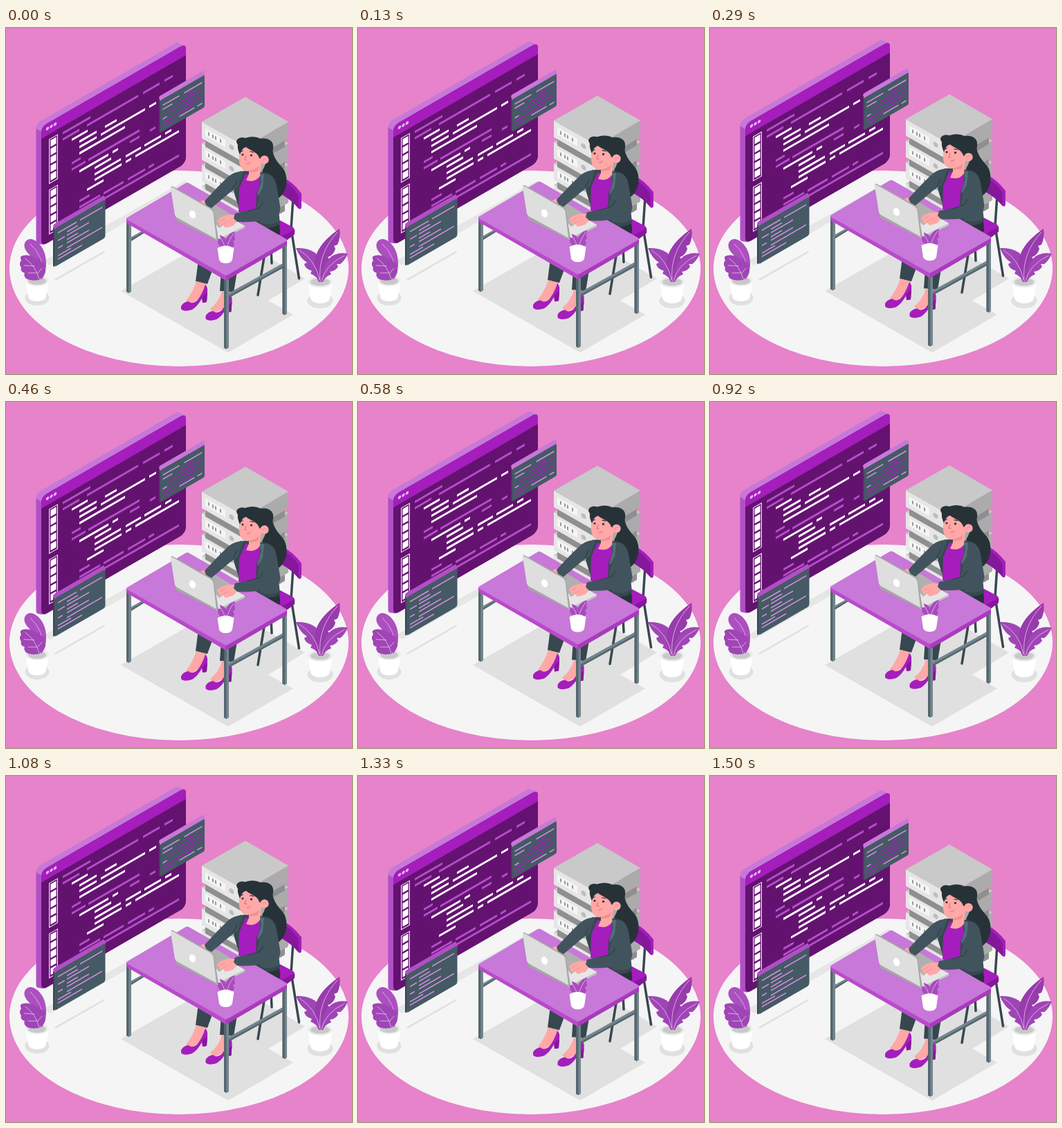
Write an HTML page that moves like this. It is 500 px wide and 500 px high and loops after 1540 ms.

```html
<!DOCTYPE html>
<html lang="en">
<head>
<meta charset="utf-8">
<title>Developer at a desk</title>
<style>
  html, body { margin: 0; width: 100%; height: 100%; overflow: hidden; background: #e683cb; }
  svg { display: block; width: 100%; height: 100%; }
  .shade { fill: #e0e0e0; }
  .vivid { fill: #a51dbd; }
  .deep { fill: #85189a; }
  .light { fill: #c778d8; }
  .slate { fill: #455a64; }
  .dark { fill: #37474f; }
  .sleeve { fill: #41545d; }
  .hair { fill: #263238; }
  .skin { fill: #ffa8a7; }
  .leaf { fill: #a045b5; }
  .line { fill: none; stroke-linecap: round; stroke-linejoin: round; }
  .vein { fill: none; stroke: #e6c6ee; stroke-width: .8; stroke-linecap: round; }
</style>
</head>
<body>
<svg viewBox="0 0 500 500">
  <ellipse cx="250" cy="347.5" rx="245" ry="141.5" fill="#f5f5f5"/>
  <g class="shade">
    <path d="M166 380 262 325 300 300 350 315 378 331 432 362 379 394 415 414 321 469z"/>
    <path d="M54 337 258 221 268 226 64 343z" fill="#e6e6e6"/>
    <path d="M70 363 142 322 143 324 72 365z"/>
    <ellipse cx="45" cy="390" rx="17.5" ry="11"/>
    <ellipse cx="454" cy="394" rx="18.5" ry="11"/>
  </g>

  <g id="float">
    <!-- large code window -->
    <g transform="translate(51 143) skewY(-30)">
      <path class="light" d="M-7.5-2q0-7 7-7H196L207 2 0 14z"/>
      <path fill="#b14fc6" d="M-7.5-2 0 7V165L3 172-5 166Q-7.5 164-7.5 160z"/>
      <rect width="209" height="173" rx="8" fill="#641270"/>
      <path class="vivid" d="M0 17V8Q0 0 8 0H201Q209 0 209 8V17z"/>
      <g fill="#e6bdee"><circle cx="9" cy="7.5" r="2.2"/><circle cx="14.5" cy="7.5" r="2.2"/><circle cx="20" cy="7.5" r="2.2"/></g>
      <g id="sidebar"></g>
      <g id="code"></g>
    </g>

    <!-- servers -->
    <g id="servers"></g>

    <!-- small windows -->
    <g transform="translate(222.500 103) skewY(-30)">
      <path class="light" d="M-1.500-3Q-1.500-5 1-5H63L64.500 0V4H0z"/>
      <path class="dark" d="M-1.500-3 0 2V48L-1.500 46z"/>
      <rect y="2" width="64.500" height="46.500" rx="2" class="slate"/>
      <g id="snippetA"></g>
    </g>
    <g transform="translate(70 288) skewY(-30)">
      <path fill="#b14fc6" d="M-2-3Q-2-5 1-5H71L73.500 0V4H0z"/>
      <path class="dark" d="M-2-2 0 2V57L-2 55z"/>
      <rect y="2" width="73.500" height="55.500" rx="3" class="slate"/>
      <g id="snippetB"></g>
    </g>

    <!-- chair -->
    <g class="line" stroke="#37474f" stroke-width="3.500">
      <path d="M415 245 412 290 423.500 362M383 318 384 340M374 325 364 386"/>
    </g>
    <path class="vivid" d="M400 216Q414 222 427 239V259Q426 263 423 261 412 248 399 241z"/>
    <path class="deep" d="M400 220Q413 227 423 242L423 261Q412 248 399 241z"/>
    <path class="vivid" d="M370 288 396 278 415 288Q418 290 417 298L405 307 390 310z"/>
    <path class="deep" d="M390 306 417 291V298L404 308z"/>

    <!-- legs -->
    <path class="dark" d="M278 335 302 340 291 370 274 366z"/>
    <path class="dark" d="M311 350 334 352 329 382 309 380z"/>
    <path class="skin" d="M275 366 290 370 284 388 266 399 260 394Q270 382 275 366z"/>
    <path class="skin" d="M312 380 326 382 319 403 301 412 295 406Q308 396 312 380z"/>
    <g id="shoe">
      <path class="vivid" d="M253 402Q256 396 264 395 268 400 276 394 283 386 288 371 292 374 291 382L290 396 284 397 283 391Q277 402 269 407 257 411 253 406z"/>
      <path class="deep" d="M284 388 291 382 290 396 284 397z"/>
    </g>
    <use href="#shoe" transform="translate(35.500 14)"/>

    <!-- torso -->
    <path class="hair" d="M374 178C379 190 374 200 370 207L392 247C408 238 408 214 401 204 396 197 387 190 385 176z"/>
    <path class="hair" d="M352 275 390 270Q397 284 396 298L384 300z"/>
    <path class="dark" d="M338 207 352 206 374 209Q387 211 389 224L396 282Q389 292 364 287L340 271 329 236z"/>
    <path class="vivid" d="M346 211 366 214 369 222 362 240 361 268 336 266 337 232z"/>
    <path class="sleeve" d="M366 211Q383 209 388 220L395 279Q386 286 368 282L362 262 367 236z"/>
    <path fill="#546e7a" d="M367 211 373 211 371 231 364 243 363 240 369 222z"/>
    <path class="skin" d="M351 196 369 194 367 214Q360 224 347 220L351 211z"/>
    <path fill="#f28f8f" d="M352 205Q361 205 366 199L364 207 352 209z"/>

    <!-- head -->
    <path class="skin" d="M341 168Q336 180 337 193 338 205 348 207 359 206 369 197L373 172 357 164z"/>
    <path class="hair" d="M333 165C333 160 339 157 346 159 354 156 363 157 368 160 377 158 386 163 386 170 387 178 383 184 380 186L371 191 366 188Q364 181 355 177 349 174 347 172 341 173 338 183 334 174 335 169z"/>
    <circle class="skin" cx="373.500" cy="190.500" r="6.200"/>
    <path class="line" d="M371 191q2-3 5-2" stroke="#f28f8f" stroke-width="1.200"/>
    <g class="hair"><circle cx="342" cy="183" r="1.500"/><circle cx="354.500" cy="184" r="1.600"/></g>
    <g class="line" stroke="#263238" stroke-width="1.200"><path d="M339 179 342 177.500M353 178.500 358 179.500"/></g>
    <g class="line" stroke="#e5747a" stroke-width="1.200"><path d="M347 185 345 190.500 348 191M348 196Q351 197 353 194"/></g>

    <!-- table -->
    <g fill="#74868d">
      <path d="M174 280h7V381l-3.500 2-3.500-2z"/>
      <path d="M181 302 208 287V291L181 307z"/>
      <path d="M399.500 312h6.500V413l-3 2-3.500-2z"/>
      <path d="M322 383 400 340V346L322 389z"/>
      <path d="M315 360h7V462l-3.500 2-3.500-2z"/>
    </g>
    <g fill="#55666e">
      <path d="M174 280h3.500V383l-3.500-2zM399.500 312h3.500V415l-3.500-2zM315 360h3.500V464l-3.500-2z"/>
      <path d="M181 305 205 291V293L181 308zM322 387 400 344V347L322 390z"/>
    </g>
    <path fill="#b94acb" d="M174 275 318 357V365L176 283Q174 282 174 279z"/>
    <path fill="#a93abd" d="M318 357 406 306V312Q406 314 404 315L318 365z"/>
    <path class="light" d="M175 274 260 224Q262 223 264 224L405 305Q407 307 405 308L320 357Q318 358 316 357L175 277Q173 275.500 175 274z"/>

    <!-- laptop and arms -->
    <path fill="#c4c4c4" d="M246 274 285 252 345 286V289L306 308z"/>
    <path fill="#e6e6e6" d="M249 273 285 252 345 286 306 305z"/>
    <path fill="#b0b0b0" d="M284 261 300 254 331 273 308 289z"/>
    <path class="skin" d="M281 251Q286 247 292 250L297 259 288 262Q281 258 279 254z"/>
    <path class="sleeve" d="M343 207Q331 207 322 214 305 230 287 250 289 259 296 261L322 239 335 230z"/>
    <path class="line" d="M328 232 334 221" stroke="#2f3e46" stroke-width="1.200"/>
    <path fill="#a6a6a6" d="M238 230 240 228.500 300 262 307 305 304 307 246 278z"/>
    <path fill="#dedede" d="M238 232Q237 229 240 230L296 262Q299 264 299.500 267L304 305 248 274.500Q245 273 244 270z"/>
    <ellipse cx="269.500" cy="269.500" rx="4.500" ry="6" transform="rotate(-22 269.500 269.500)" fill="#fff"/>
    <path class="skin" d="M333 270 321 270Q310 272 306 277 304 281 308 282L307 286 314 285 317 289 328 286 333 281z"/>
    <path class="line" d="M309 280 316 276M313 284 320 280" stroke="#f28f8f" stroke-width="1"/>
    <path class="sleeve" d="M374 211Q388 211 391 228L396 257Q398 270 386 274 360 282 334 280L329 275 331 268L364 261 371 251z"/>
    <path class="line" d="M372 252 366 260 349 265" stroke="#2f3e46" stroke-width="1.200"/>

    <!-- desk plant -->
    <path fill="#a94bbd" d="M317 319Q305 316 306 305L310 305 309 299 315 302 318 306Q321 296 331 294L330 301 331 306 328 308 330 313 326 319z"/>
    <path class="vein" d="M317 319Q315 310 310 303M319 318Q322 306 329 297"/>
    <path fill="#fff" d="M305.500 318 308 335Q310 340 317.500 340T327 335L329.500 318Q317.500 311 305.500 318z"/>
  </g>

  <!-- left plant -->
  <path fill="#fff" d="M28.500 366 32 388Q34 395 45 395T58 388L61.500 366z"/>
  <ellipse cx="45" cy="365" rx="16.500" ry="8" fill="#ebebeb"/>
  <ellipse cx="45" cy="365.500" rx="13" ry="5.500" fill="#c9c9c9"/>
  <path fill="#ad4fc1" d="M51 364Q49 344 34 328 23 317 28 309 34 301 45 309 59 321 58 344 57 357 51 364z"/>
  <path class="vein" d="M35 312Q53 328 54 354"/>
  <path class="leaf" d="M48 364Q36 366 29 362 25 358 27 354 20 352 22 346 18 341 22 336 19 330 24 329 32 327 40 331L45 334 49 332Q49 338 54 339 58 342 55 347 59 351 55 357z"/>
  <path class="vein" d="M48 363Q43 344 28 333M45 354 32 354M41 344 26 343M46 354 52 347"/>

  <!-- right plant -->
  <path fill="#fff" d="M436.500 368 440 391Q443 398 454 398T468 391L471.500 368z"/>
  <ellipse cx="454" cy="367" rx="17.500" ry="8" fill="#ebebeb"/>
  <ellipse cx="454" cy="367" rx="14" ry="5.500" fill="#c9c9c9"/>
  <path class="leaf" d="M452 367Q449 358 440 355L442 351Q432 348 431 341L435 339Q425 333 419 318 436 317 447 325 456 333 456 367z"/>
  <path fill="#983bad" d="M452 366Q442 343 449 326 456 308 482 290 484 303 479 313L474 315 476 319Q473 329 465 331L468 335Q458 350 456 366z"/>
  <path class="leaf" d="M455 367Q456 346 466 334 476 323 494 326 489 337 483 341L478 341 480 345Q475 352 468 352L470 356Q461 359 458 367z"/>
  <path class="vein" d="M454 366Q450 326 479 295M453 364Q448 336 424 321M456 366Q461 342 489 329"/>
</svg>

<script>
  const byId = id => document.getElementById(id);
  const rect = (x, y, w, h, fill) => `<rect x="${x}" y="${y}" width="${w}" height="${h}" fill="${fill}"/>`;

  // Each row: y, colour, then start and end of every dash.
  function dashes(id, rows, height) {
    byId(id).innerHTML = rows.map(([y, fill, ...ends]) => {
      let out = '';
      for (let i = 0; i < ends.length; i += 2)
        out += rect(ends[i], y - height / 2, ends[i + 1] - ends[i], height, fill);
      return out;
    }).join('');
  }

  const white = '#fff', violet = '#b54fc9', pale = '#d58fe2', purple = '#a51dbd';
  dashes('code', [
    [27, violet, 31, 71],
    [36, violet, 31, 55, 66, 140, 147, 171, 178, 190],
    [44, white, 44, 67],
    [53, white, 55, 80, 92, 109],
    [61, white, 55, 80, 86, 150, 156, 166],
    [70, white, 55, 121],
    [78, violet, 44, 57],
    [87, violet, 44, 64, 68, 142],
    [96, white, 55, 97, 103, 111],
    [96, violet, 128, 142, 157, 165],
    [104, white, 77, 101],
    [113, white, 77, 115, 122, 144, 149, 173, 179, 188],
    [121, white, 77, 116, 122, 130, 136, 199],
    [129, white, 66, 90],
    [139, violet, 55, 70],
    [148, violet, 55, 85, 90, 119, 125, 150, 155, 163],
    [156, violet, 70, 85, 92, 199]
  ], 3.3);

  dashes('snippetA', [
    [11, pale, 4, 28, 35, 61],
    [16, purple, 36, 48], [17, pale, 4, 18],
    [21, purple, 25, 61], [26, purple, 12, 50],
    [31, purple, 36, 61], [31, pale, 4, 10],
    [36, purple, 4, 48], [41, pale, 28, 50, 54, 61],
    [42, purple, 4, 20]
  ], 1.8);

  dashes('snippetB', [
    [11, pale, 5, 32, 37, 69],
    [17, pale, 18, 34], [22, pale, 5, 15, 18, 50],
    [28, pale, 18, 34], [33, pale, 5, 12, 18, 50],
    [40, pale, 18, 69], [44, pale, 5, 24],
    [49, pale, 5, 40]
  ], 1.8);

  byId('sidebar').innerHTML = [24, 97].map(top => {
    let out = rect(11, top, 13, 65, '#efdcf3') + rect(12.2, top + 1.2, 10.6, 62.6, '#641270');
    for (let i = 0; i < 5; i++) out += rect(13.5, top + 3 + i * 12.2, 8, 9.5, white);
    return out;
  }).join('');

  // One isometric box with its front details, top corner at height y.
  const unit = y => `<g transform="translate(283 ${y})">
    <path fill="#8f8f8f" d="M5 24 63 57 120 24V36L63 69 5 36z"/>
    <path fill="#e6e6e6" d="M0 0 63 36V60L0 24z"/>
    <path fill="#ababab" d="M63 36 125 0V24L63 60z"/>
    <path fill="#c9c9c9" d="M0 0 63-36 125 0 63 36z"/>
    <g transform="skewY(30)">
      ${rect(5, 6.5, 29, 11, '#f5f5f5')}
      ${[9, 15, 19, 26].map(x => rect(x, 9.5, 2, 5, '#999')).join('')}
      <circle cx="43" cy="12" r="3.500" fill="#bdbdbd"/>
    </g></g>`;
  byId('servers').innerHTML = [228.5, 197.5, 166.5, 135.5].map(unit).join('');

  const LOOP = 1540, RISE = 10;
  function draw(now) {
    const phase = now % LOOP / LOOP;
    const lift = RISE * (1 - Math.abs(1 - 2 * phase));
    byId('float').setAttribute('transform', `translate(0 ${-lift})`);
    requestAnimationFrame(draw);
  }
  draw(performance.now());
</script>
</body>
</html>
```
